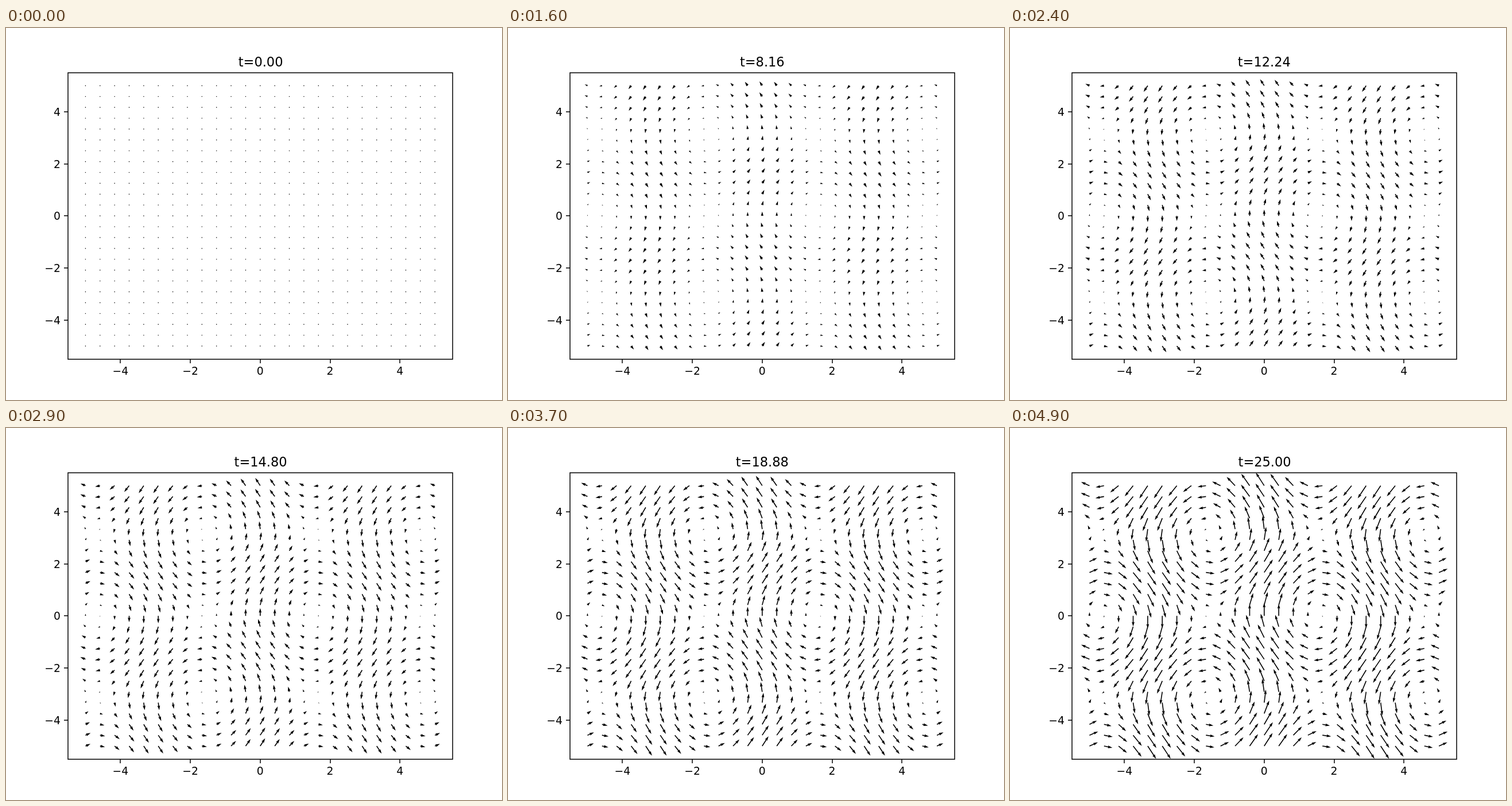
Animation of 864x648 px, one loop 5000 ms. Source, as an HTML page with a canvas:

```html
<!DOCTYPE html>
<html lang="en">
<head>
<meta charset="utf-8">
<title>Vector field</title>
<style>
html, body { margin: 0; width: 100%; height: 100%; overflow: hidden; background: #fff; }
canvas { display: block; width: 864px; height: 648px; }
</style>
</head>
<body>
<canvas id="plot" width="864" height="648"></canvas>
<script>
const ctx = document.getElementById('plot').getContext('2d');
const FONT = '"DejaVu Sans", Verdana, sans-serif';
const STEPS = 50, STEP_MS = 100, T_MAX = 25;
const GRID = 25;
const BOX = { x: 108, y: 77.76, w: 669.6, h: 498.96 };
const SX = BOX.w / 11, SY = BOX.h / 11;
const CX = BOX.x + BOX.w / 2, CY = BOX.y + BOX.h / 2;
const SHAFT = 0.0024 * BOX.w;
const HEAD = { length: 5, axis: 4.5, width: 3 };
const SCALE = 50;
const TICKS = [-4, -2, 0, 2, 4];

const px = x => CX + x * SX;
const py = y => CY - y * SY;

function polygon(points) {
  points.forEach(([x, y], i) => i ? ctx.lineTo(x, y) : ctx.moveTo(x, y));
  ctx.closePath();
}

// Outline of a horizontal arrow, in units of the shaft width
function arrowShape(len) {
  if (len < 1) {
    return Array.from({ length: 6 }, (_, i) =>
      [Math.cos(i * Math.PI / 3) / 2, Math.sin(i * Math.PI / 3) / 2]);
  }
  const k = Math.min(1, len / HEAD.length);
  const half = [
    [0, k / 2],
    [len - HEAD.axis * k, k / 2],
    [len - HEAD.length * k, HEAD.width * k / 2]
  ];
  const mirror = half.map(([x, y]) => [x, -y]).reverse();
  return [...half, [len, 0], ...mirror];
}

function arrow(x, y, dx, dy) {
  const len = Math.hypot(dx, dy) / SHAFT;
  const angle = Math.atan2(dy, dx);
  const c = Math.cos(angle) * SHAFT, s = Math.sin(angle) * SHAFT;
  polygon(arrowShape(len).map(([u, v]) => [x + u * c - v * s, y + u * s + v * c]));
}

function drawField(t) {
  ctx.save();
  ctx.beginPath();
  ctx.rect(BOX.x, BOX.y, BOX.w, BOX.h);
  ctx.clip();
  ctx.beginPath();
  for (let i = 0; i < GRID; i++) {
    for (let j = 0; j < GRID; j++) {
      const x = -5 + 10 * i / (GRID - 1);
      const y = -5 + 10 * j / (GRID - 1);
      const u = 0.5 * t * Math.sin(y);
      const v = t * Math.cos(x);
      arrow(px(x), py(y), u * SX / SCALE, -v * SY / SCALE);
    }
  }
  ctx.fill();
  ctx.restore();
}

function drawAxes() {
  ctx.lineWidth = 1.5;
  ctx.strokeRect(108, 78, 670, 499);
  ctx.font = '18.75px ' + FONT;
  ctx.beginPath();
  for (const v of TICKS) {
    const x = Math.round(px(v)), y = Math.round(py(v));
    const label = String(v).replace('-', '\u2212');
    ctx.moveTo(x, 577);
    ctx.lineTo(x, 584);
    ctx.moveTo(108, y);
    ctx.lineTo(101, y);
    ctx.textAlign = 'center';
    ctx.fillText(label, px(v), 604);
    ctx.textAlign = 'right';
    ctx.fillText(label, 94.9, y + 7);
  }
  ctx.stroke();
}

function drawTitle(t) {
  const text = 't=' + t.toFixed(2);
  ctx.font = '22.5px ' + FONT;
  ctx.textAlign = 'center';
  // A closing zero leaves a little more room on its right
  ctx.fillText(text, CX + (text.endsWith('0') ? 0.8 : 0), 67);
}

function draw(step) {
  const t = T_MAX * step / (STEPS - 1);
  ctx.fillStyle = '#fff';
  ctx.fillRect(0, 0, 864, 648);
  ctx.fillStyle = ctx.strokeStyle = '#000';
  drawField(t);
  drawAxes();
  drawTitle(t);
}

const start = performance.now();
let shown = 0;

function tick() {
  const step = Math.floor((performance.now() - start) / STEP_MS) % STEPS;
  if (step !== shown) draw(shown = step);
  requestAnimationFrame(tick);
}

draw(0);
requestAnimationFrame(tick);
</script>
</body>
</html>
```
